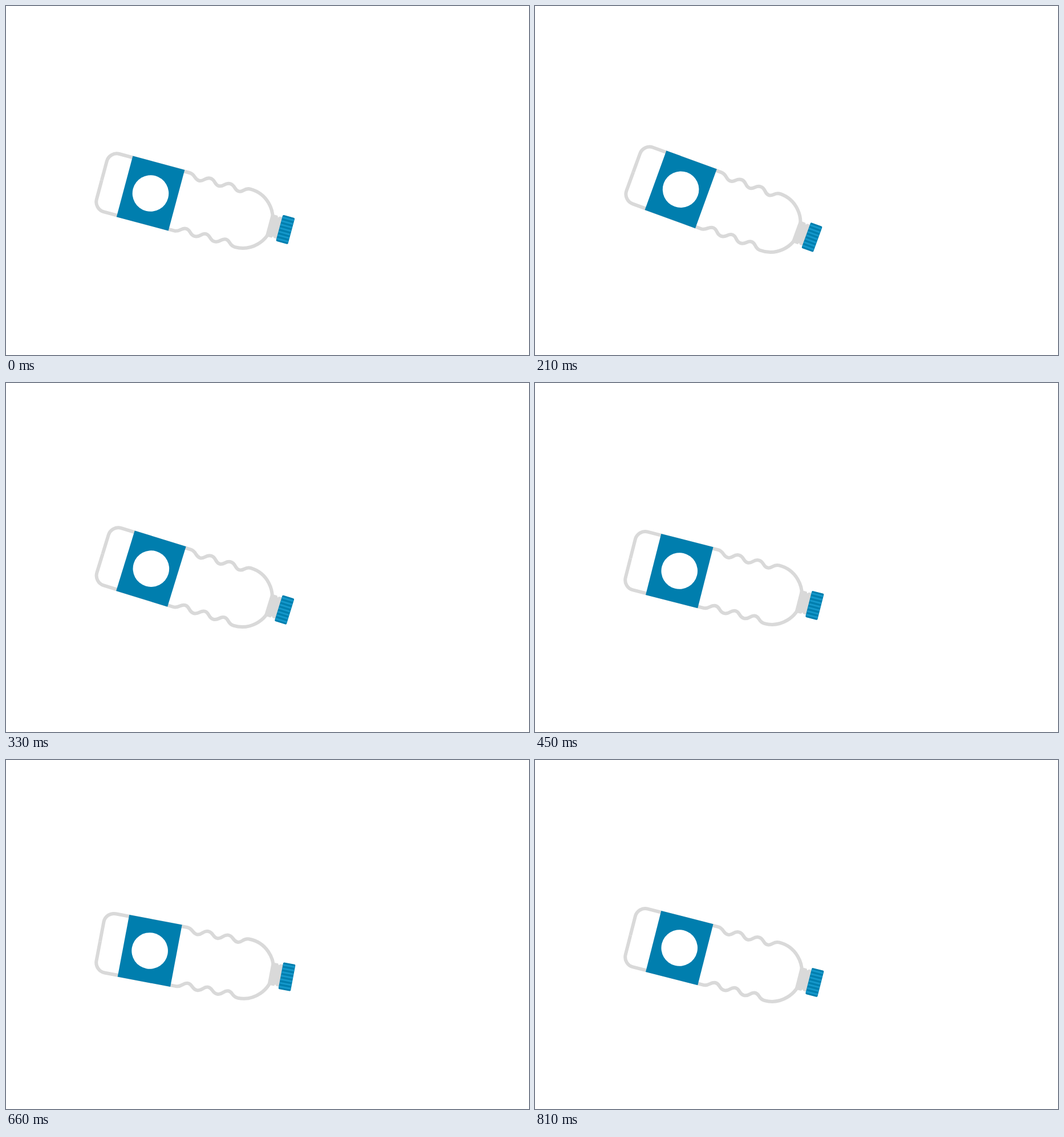
These frames come from a looping animation (917 px wide and 611 px high, 840 ms). An HTML page:

```html
<!DOCTYPE html>
<html lang="en">
<head>
<meta charset="utf-8">
<title>Rocking bottle</title>
<style>
  html, body { margin: 0; width: 100%; height: 100%; overflow: hidden; background: #fff; }
  svg { display: block; width: 100vw; height: 100vh; }
</style>
</head>
<body>
<svg viewBox="0 0 917 611">
  <defs>
    <path id="side" d="M-170.5 0V-34.5A18 18 0 0 1 -152.5 -52.5H-25
      C-15 -52.5 -14 -43.5 -5.5 -43.5
      S3 -52.5 12.5 -52.5 S22 -43.5 30.5 -43.5
      S39 -52.5 48.5 -52.5 S58 -43.5 66.5 -43.5
      S74 -52.5 85.5 -52.5 A52.5 52.5 0 0 1 138 0"/>
  </defs>
  <g id="bottle">
    <g fill="none" stroke="#d9d9d9" stroke-width="6">
      <use href="#side"/>
      <use href="#side" transform="scale(1 -1)"/>
    </g>
    <g fill="#d9d9d9">
      <rect x="132" y="-20" width="12.5" height="40" rx="2"/>
      <rect x="136" y="-17.5" width="17" height="35"/>
      <rect x="146" y="-19.5" width="7" height="39" rx="2"/>
    </g>
    <rect x="-128.8" y="-55.2" width="94.1" height="110.4" fill="#007eae"/>
    <circle cx="-81.8" r="31.8" fill="#fff"/>
    <rect x="152" y="-23.8" width="21.8" height="47.6" rx="2" fill="#007eae"/>
    <path id="ridges" stroke="#1598cb" stroke-width="3"/>
  </g>
</svg>
<script>
  const STEP = 30, LOOP = 840, SWING = 5, TILT = 15;
  const bottle = document.getElementById('bottle');

  let ridges = '';
  for (let i = -3; i <= 3; i++) ridges += `M152.5 ${i * 6.4}H173.3`;
  document.getElementById('ridges').setAttribute('d', ridges);

  // Triangle wave from -1 to 1, starting at 0 and rising.
  const triangle = p => 1 - 4 * Math.abs((p + 0.25) % 1 - 0.5);

  function draw(now) {
    const time = Math.floor(now % LOOP / STEP) * STEP;
    const angle = TILT + SWING * triangle(time / LOOP);
    bottle.setAttribute('transform', `translate(332.5 349.2) rotate(${angle})`);
  }

  const start = performance.now();
  function tick() {
    draw(performance.now() - start);
    requestAnimationFrame(tick);
  }
  tick();
</script>
</body>
</html>
```
